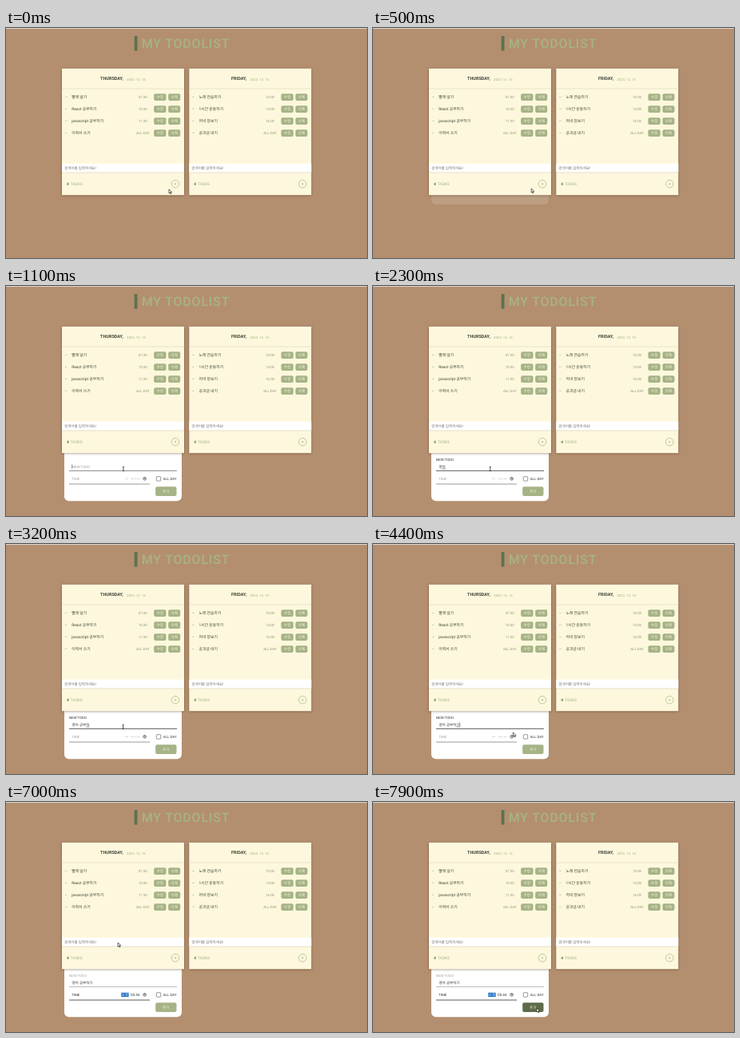
An HTML page with a canvas that plays this animation: 452x288 px, repeating every 8 s.

```html
<!DOCTYPE html>
<html lang="ko">
<head>
<meta charset="utf-8">
<title>Todo list</title>
<style>
html, body { margin: 0; width: 100%; height: 100%; overflow: hidden; background: #b48f6f; }
canvas { display: block; width: 452px; height: 288px; }
</style>
</head>
<body>
<canvas id="stage"></canvas>
<script>
const W = 452, H = 288, LOOP = 8000;
const FONT = 'Roboto, "Noto Sans CJK KR", "Noto Sans CJK", sans-serif';
const C = {
  wall: '#b48f6f', cream: '#fdf8dd', sage: '#a6b386', moss: '#5b7350',
  ink: '#3c4236', time: '#8f9a76', pale: '#a9a9a9', rule: '#a2a2a2', dark: '#333', blue: '#1b6fc2'
};

const canvas = document.getElementById('stage');
const ctx = canvas.getContext('2d');
const ratio = window.devicePixelRatio || 1;
canvas.width = W * ratio;
canvas.height = H * ratio;

const clamp = v => Math.max(0, Math.min(1, v));
const smooth = v => v * v * (3 - 2 * v);
const lerp = (a, b, k) => a + (b - a) * k;
const ramp = (t, from, to) => smooth(clamp((t - from) / (to - from)));
const gray = k => { const v = Math.round(lerp(165, 48, k)); return `rgb(${v},${v},${v})`; };

function text(s, x, y, size, color, { align = 'left', weight = 400, gap = 0 } = {}) {
  ctx.font = `${weight} ${size}px ${FONT}`;
  ctx.letterSpacing = gap + 'px';
  ctx.textAlign = align;
  ctx.fillStyle = color;
  ctx.fillText(s, x, y + size * 0.36);
}

function box(x, y, w, h, r, color) {
  ctx.fillStyle = color;
  ctx.beginPath();
  ctx.roundRect(x, y, w, h, r);
  ctx.fill();
}

function line(x1, y1, x2, y2, color, width = 0.7) {
  ctx.strokeStyle = color;
  ctx.lineWidth = width;
  ctx.beginPath();
  ctx.moveTo(x1, y1);
  ctx.lineTo(x2, y2);
  ctx.stroke();
}

function button(label, x, y, w, h, size, color = C.sage) {
  box(x, y, w, h, 2, color);
  text(label, x + w / 2, y + h / 2, size, C.cream, { align: 'center' });
}

const cards = [
  { x: 70, day: 'THURSDAY,', dayX: 118, date: '2023. 12. 14', dateX: 151, items: [
    ['빨래 널기', '07:30'], ['React 공부하기', '10:30'],
    ['javascript 공부하기', '11:30'], ['이력서 쓰기', 'ALL DAY']] },
  { x: 229.3, day: 'FRIDAY,', dayX: 282, date: '2023. 12. 15', dateX: 305.5, items: [
    ['노래 연습하기', '10:00'], ['1시간 운동하기', '14:00'],
    ['저녁 장보기', '16:00'], ['공과금 내기', 'ALL DAY']] }
];

function drawCard({ x, day, dayX, date, dateX, items }) {
  ctx.save();
  ctx.shadowColor = 'rgba(50,30,10,.5)';
  ctx.shadowBlur = 3 * ratio;
  ctx.shadowOffsetY = 0.5 * ratio;
  box(x, 50.7, 153, 158.5, 0.5, C.cream);
  ctx.restore();

  text(day, dayX, 63.5, 5.5, C.ink, { weight: 700 });
  text(date, dateX, 64, 4.3, C.sage);
  line(x, 76, x + 153, 76, '#dedabf');

  items.forEach(([name, time], i) => {
    const y = 86.7 + i * 15;
    line(x + 3.8, y - 0.4, x + 6.4, y - 0.4, C.sage, 0.6);
    text(name, x + 12.2, y, 4.85, C.ink);
    text(time, x + 101.3, y, 4.4, C.time, { align: 'center' });
    button('수정', x + 115.2, y - 4.4, 15.3, 8.8, 4.5);
    button('삭제', x + 133.2, y - 4.4, 15, 8.8, 4.5);
  });

  box(x, 169.7, 153, 11, 0, '#fff');
  text('검색어를 입력하세요!', x + 3, 175.2, 4.55, '#6f6f6f');
  line(x, 181, x + 153, 181, '#d9d6c2');
  text('4', x + 6, 195.2, 4.9, C.moss, { weight: 700 });
  text('TASKS', x + 10.8, 195.2, 4.9, C.sage);

  ctx.strokeStyle = C.sage;
  ctx.lineWidth = 0.7;
  ctx.beginPath();
  ctx.arc(x + 142, 195.2, 4.8, 0, Math.PI * 2);
  ctx.stroke();
  line(x + 140.6, 195.2, x + 143.4, 195.2, C.sage, 0.6);
  line(x + 142, 193.8, x + 142, 196.6, C.sage, 0.6);
}

const typing = [
  [1700, 'ㅇ'], [1800, '여'], [2000, '영'], [2100, '영ㅇ'], [2300, '영어'],
  [2500, '영어 '], [2600, '영어 ㄱ'], [2700, '영어 고'], [2800, '영어 공'],
  [3000, '영어 공부'], [3100, '영어 공부ㅎ'], [3200, '영어 공부하'], [3400, '영어 공부하기']
];

function drawTodoField(t) {
  const focus = ramp(t, 1050, 1350) * (1 - ramp(t, 4900, 5100));
  const float = ramp(t, 1100, 1400);
  text('NEW TODO', lerp(82.8, 79, float), lerp(226, 217, float), 4.4, gray(focus));
  line(79, 231.3, 214, 231.3, gray(Math.max(focus, 0.55 * (t < 4900))), 0.8);

  const typed = typing.filter(([at]) => at <= t).pop();
  const value = typed ? typed[1] : '';
  text(value, 82.4, 226, 4.55, C.dark);
  const end = 82.4 + ctx.measureText(value).width;
  if (value && t < 4900 && !value.endsWith(' ')) line(end - 4.2, 228.8, end, 228.8, C.dark, 0.5);
  const caret = (t >= 1050 && t < 1600) || (t >= 4000 && t < 4900);
  if (caret) line(end + 0.2, 223.4, end + 0.2, 228.6, C.dark, 0.5);
}

function drawTimeField(t) {
  const focus = ramp(t, 4900, 5100);
  text('TIME', 82.2, 241.5, 4.4, gray(focus));
  line(79, 248, 180, 248, gray(Math.max(focus, 0.3)), 0.8);

  const filled = t >= 6500;
  const active = t >= 4950;
  if (active) box(filled ? 144.3 : 148.7, 238.7, filled ? 9.3 : 5.1, 5.3, 0, C.blue);
  if (filled) {
    text('오후', 149, 241.4, 4.5, '#fff', { align: 'center' });
    text('05:44', 156, 241.4, 4.6, C.dark);
  } else {
    text('--', 149.2, 241.4, 4.6, active ? '#fff' : C.dark, { gap: 1.1 });
    text('--:--', 157, 241.4, 4.6, C.dark, { gap: 1.1 });
  }

  ctx.strokeStyle = C.dark;
  ctx.lineWidth = 0.7;
  ctx.beginPath();
  ctx.arc(173.6, 241.3, 1.8, 0, Math.PI * 2);
  ctx.moveTo(173.6, 240.2);
  ctx.lineTo(173.6, 241.4);
  ctx.lineTo(174.5, 241.6);
  ctx.stroke();
}

function drawPanel(t) {
  const shown = ramp(t, 380, 900);
  if (!shown) return;
  ctx.save();
  ctx.globalAlpha = shown;
  ctx.translate(0, -56 * (1 - shown));
  box(73, 190, 147, 79.2, 6, '#fff');
  drawTodoField(t);
  drawTimeField(t);

  ctx.strokeStyle = '#555';
  ctx.lineWidth = 0.6;
  ctx.beginPath();
  ctx.roundRect(188.3, 238.7, 5.4, 5.4, 0.7);
  ctx.stroke();
  text('ALL DAY', 196.7, 241.5, 4.45, C.dark);
  button('추가', 187.2, 251.3, 26.3, 11.7, 4.6, t >= 7600 ? '#5c6b49' : C.sage);
  ctx.restore();
}

// Pointer stops: time, x, y
const path = [
  [0, 204, 202], [250, 211, 195], [400, 211, 195], [700, 173, 213], [1100, 147, 229],
  [4150, 146.5, 229], [4400, 175.5, 236], [4800, 174, 241], [5250, 174, 241],
  [5800, 117, 179], [6150, 124, 176], [6500, 126, 162], [7000, 140, 176], [7700, 205, 258], [8000, 205, 258]
];

function drawPointer(t) {
  const i = path.findIndex(([at]) => at > t);
  const [t0, x0, y0] = path[i - 1], [t1, x1, y1] = path[i];
  const k = (t - t0) / (t1 - t0);
  ctx.save();
  ctx.translate(lerp(x0, x1, k), lerp(y0, y1, k));
  if (t >= 650 && t < 4250) {
    line(0, -2.6, 0, 2.6, '#222', 0.8);
    line(-1.2, -2.6, 1.2, -2.6, '#222', 0.6);
    line(-1.2, 2.6, 1.2, 2.6, '#222', 0.6);
  } else {
    ctx.beginPath();
    [[0, 0], [0, 5], [1.2, 4], [2, 5.8], [2.9, 5.4], [2.1, 3.7], [3.7, 3.6]]
      .forEach(([x, y]) => ctx.lineTo(x, y));
    ctx.closePath();
    ctx.fillStyle = '#fff';
    ctx.strokeStyle = '#222';
    ctx.lineWidth = 0.7;
    ctx.fill();
    ctx.stroke();
  }
  ctx.restore();
}

function draw(now) {
  const t = now % LOOP;
  ctx.setTransform(ratio, 0, 0, ratio, 0, 0);
  ctx.textRendering = 'geometricPrecision';
  box(0, 0, W, H, 0, C.wall);
  box(0, 0, W, 1, 0, '#ddd6cf');
  box(160.7, 10, 3.8, 18.5, 0, C.moss);
  text('MY TODOLIST', 169.7, 19.6, 16, C.sage, { weight: 500, gap: 0.8 });
  drawPanel(t);
  cards.forEach(drawCard);
  drawPointer(t);
}

const start = performance.now();
function tick() {
  draw(performance.now() - start);
  requestAnimationFrame(tick);
}
tick();
</script>
</body>
</html>
```
